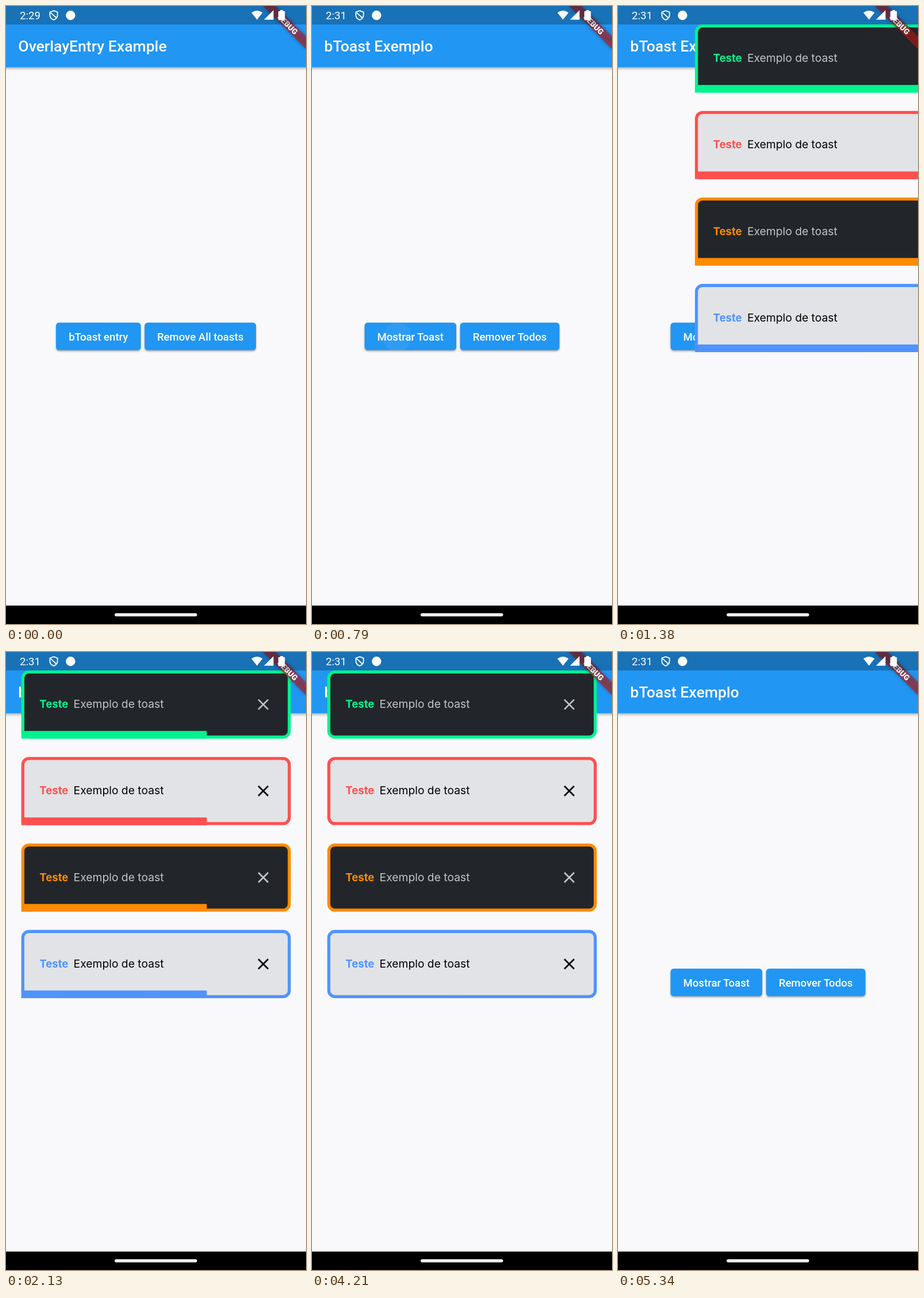
Write an HTML page that moves like this. It is 522 by 1073 pixels and loops after 5.39 s.

```html
<!DOCTYPE html>
<html lang="pt">
<head>
<meta charset="utf-8">
<style>
html, body { margin: 0; width: 100%; height: 100%; overflow: hidden; background: #f9f9fb; }
svg { display: block; width: 100vw; height: 100vh; }
text { font-family: Roboto, sans-serif; fill: #fff; }
.title { font-size: 26.56px; font-weight: 500; }
.button { font-size: 18.6px; font-weight: 500; text-anchor: middle; }
.toast text { font-family: Inter, sans-serif; }
.raised { filter: drop-shadow(0 2px 1.5px rgba(0, 0, 0, .34)); }
.bar { filter: drop-shadow(0 2.5px 2.5px rgba(0, 0, 0, .36)); }
.banner { filter: drop-shadow(0 0 3px rgba(0, 0, 0, .4)); }
</style>
</head>
<body>
<svg viewBox="0 0 522 1073">
  <defs>
    <clipPath id="press"><rect x="91.5" y="549.8" width="159.5" height="47.8" rx="5.3"/></clipPath>
  </defs>
  <rect width="522" height="1073" fill="#f9f9fb"/>
  <rect class="bar" x="-10" y="-10" width="542" height="116.2" fill="#2196f3"/>
  <g id="intro"></g>
  <g id="home"></g>
  <g id="toasts"></g>

  <g transform="translate(522 0) rotate(45)">
    <rect class="banner" x="-53.1" y="37.2" width="106.2" height="15.9" fill="#b71c1c" fill-opacity=".63"/>
    <text y="50" font-size="13.5" font-weight="900" text-anchor="middle">DEBUG</text>
  </g>

  <rect width="522" height="32" fill="#000" fill-opacity=".25"/>
  <text id="clock" x="24" y="23" font-size="18.6"></text>
  <g fill="#fff">
    <path d="M83 8.2L89.6 10.7V16C89.6 20 86.8 22.8 83 24.2C79.2 22.8 76.4 20 76.4 16V10.7Z M78 11.8L88 21"
          fill="none" stroke="#fff" stroke-width="1.8"/>
    <circle cx="112.3" cy="16.3" r="8.2"/>
    <path d="M427 11.5Q436.7 4.5 446.4 11.5L436.7 23.8Z"/>
    <path d="M465.5 7.3V23.8H449Z"/>
    <path d="M477.3 7H481.7V8.8H483.8Q485.3 8.8 485.3 10.3V23.3Q485.3 24.8 483.8 24.8H475.3Q473.8 24.8 473.8 23.3V10.3Q473.8 8.8 475.3 8.8H477.3Z"/>
  </g>

  <rect y="1041" width="522" height="32"/>
  <rect x="189" y="1054.2" width="143.5" height="5.6" rx="2.8" fill="#f1eeef"/>
</svg>
<script>
const LOOP = 5390, INTRO_END = 40;
const TAP = 660, SHOW = 1216, HIDE = 4400, SLIDE = 300, COUNTDOWN = 2932;
const LEFT = 26.6, WIDTH = 468.9, HEIGHT = 118.4, PITCH = 150.2;

const get = id => document.getElementById(id);
const clamp = v => Math.min(1, Math.max(0, v));
const decelerate = v => 1 - (1 - v) ** 2;

const button = (x, width, label, ink = '') =>
  `<rect class="raised" x="${x}" y="549.8" width="${width}" height="47.8" rx="5.3" fill="#2196f3"/>${ink}
   <text class="button" x="${x + width / 2}" y="580.5">${label}</text>`;

const screen = (title, buttons) => `<text class="title" x="21.3" y="79.3">${title}</text>${buttons}`;

const toast = ([color, dark], i) => {
  const ink = dark ? '#c4c4c5' : '#000';
  return `<g class="toast" transform="translate(${LEFT} ${32 + i * PITCH})">
    <rect x="2.65" y="2.65" width="${WIDTH - 5.3}" height="${HEIGHT - 5.3}" rx="10.6"
      fill="${dark ? '#22262b' : '#e2e3e6'}" stroke="${color}" stroke-width="5.3"/>
    <rect class="progress" y="${HEIGHT - 13.3}" height="13.3" fill="${color}"/>
    <text x="31.6" y="65.3" font-size="18.6" font-weight="700" style="fill:${color}">Teste</text>
    <text x="91" y="65.3" font-size="19.3" style="fill:${ink}">Exemplo de toast</text>
    <path d="M412.5 50.6l17 17m0 -17l-17 17" stroke="${ink}" stroke-width="2.7"/>
  </g>`;
};

get('intro').innerHTML = screen('OverlayEntry Example',
  button(87, 147.5, 'bToast entry') + button(241.2, 193.8, 'Remove All toasts'));
get('home').innerHTML = screen('bToast Exemplo',
  button(91.5, 159.5, 'Mostrar Toast',
    '<circle id="ripple" cx="148" cy="575" fill="#fff" clip-path="url(#press)"/>') +
  button(257.7, 172.8, 'Remover Todos'));
get('toasts').innerHTML = [['#00f38f', true], ['#ff4f4f', false], ['#ff8b00', true], ['#4f93ff', false]]
  .map(toast).join('');

const bars = document.querySelectorAll('.progress');
const show = (id, on) => get(id).setAttribute('display', on ? 'inline' : 'none');

function draw(t) {
  const intro = t < INTRO_END;
  show('intro', intro);
  show('home', !intro);
  get('clock').textContent = intro ? '2:29' : '2:31';

  const press = clamp((t - TAP) / 500);
  get('ripple').setAttribute('r', 25 * press / .26);
  get('ripple').setAttribute('fill-opacity', .06 * clamp(press * 5) * clamp((1 - press) * 2));

  const entered = t < HIDE
    ? decelerate(clamp((t - SHOW) / SLIDE))
    : decelerate(clamp(1 - (t - HIDE) / SLIDE));
  show('toasts', entered > 0);
  get('toasts').setAttribute('transform', `translate(${522 * (1 - entered)} 0)`);
  const left = WIDTH * (1 - clamp((t - SHOW) / COUNTDOWN));
  bars.forEach(bar => bar.setAttribute('width', left));
}

let start;
function tick(now) {
  start ??= now;
  draw((now - start) % LOOP);
  requestAnimationFrame(tick);
}
draw(0);
requestAnimationFrame(tick);
</script>
</body>
</html>
```
